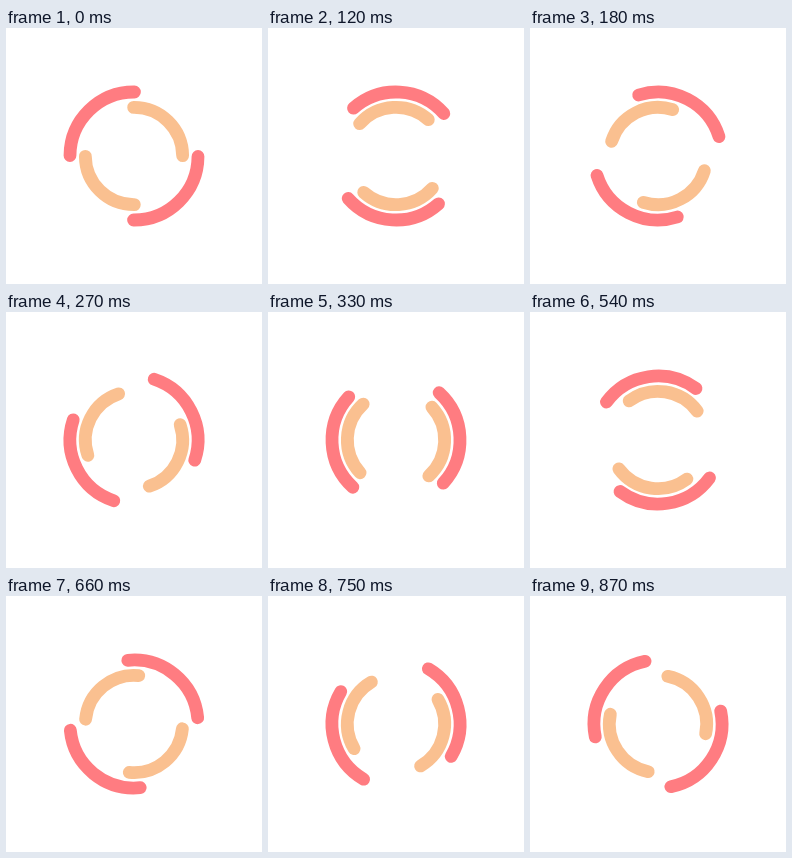
Animation, 256 px wide and 256 px high, one loop 0.9 s. Source, as an HTML page:

```html
<!DOCTYPE html>
<html lang="en">
<head>
<meta charset="utf-8">
<title>Double ring loader</title>
<style>
  html, body { margin: 0; width: 100%; height: 100%; overflow: hidden; background: #fff; }
  svg { display: block; width: 100%; height: 100%; }
  path { fill: none; stroke-width: 5; stroke-linecap: round; }
</style>
</head>
<body>
<svg viewBox="0 0 100 100">
  <g transform="translate(50 50)">
    <path id="outer" stroke="#ff7c81" d="M-25 0A25 25 0 0 1 0 -25M25 0A25 25 0 0 1 0 25"/>
    <path id="inner" stroke="#fac090" d="M0 -19A19 19 0 0 1 19 0M0 19A19 19 0 0 1 -19 0"/>
  </g>
</svg>
<script>
  const LOOP = 900;
  const outer = document.getElementById('outer');
  const inner = document.getElementById('inner');

  // The rings turn at the same steady speed in opposite directions.
  function draw(time) {
    const angle = (time % LOOP) / LOOP * 360;
    outer.setAttribute('transform', `rotate(${angle})`);
    inner.setAttribute('transform', `rotate(${-angle})`);
  }

  function tick(now) {
    draw(now);
    requestAnimationFrame(tick);
  }

  draw(0);
  requestAnimationFrame(tick);
</script>
</body>
</html>
```
